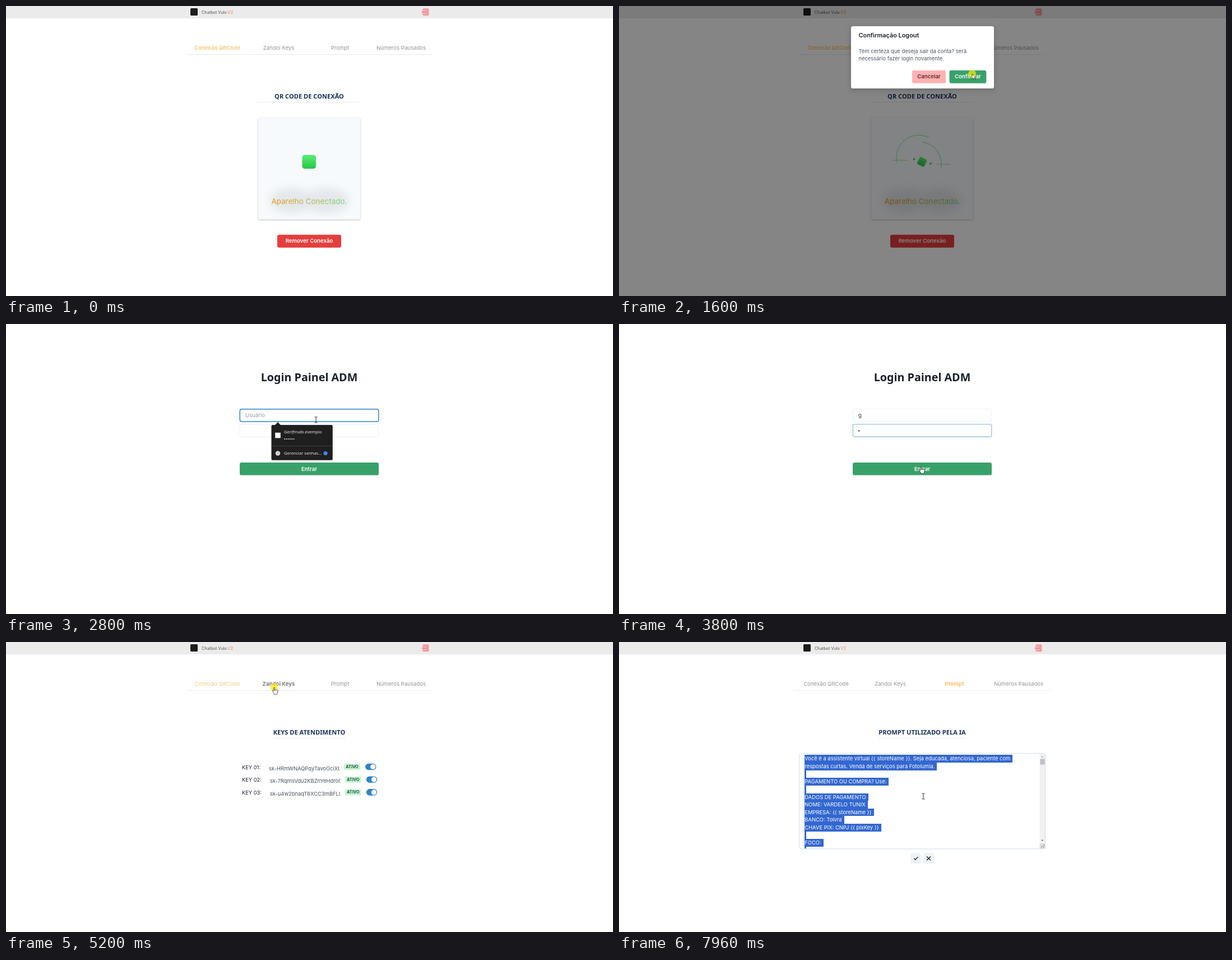
An HTML page for the animation above (8 s loop, 1083 by 517 pixels).

```html
<!DOCTYPE html>
<html lang="pt-BR">
<head>
<meta charset="utf-8">
<title>Painel</title>
<style>
html, body { margin: 0; width: 100%; height: 100%; overflow: hidden; background: #fff; }
svg { display: block; width: 100vw; height: 100vh; }
text, p { font: 400 9.6px Inter, "Open Sans", sans-serif; }
.mid { text-anchor: middle; }
.bold { font-weight: 600; }
.body { font-size: 9.4px; fill: #4a5568; }
.title { font: 700 11.1px "Noto Sans", "Open Sans", sans-serif; fill: #153057; text-anchor: middle; }
.rule { stroke: #e6eaee; stroke-width: 1; }
.white { fill: #fff; }

/* 1% of the loop is 80 ms */
.cut { animation: 8s step-end infinite; }
.flow { animation: 8s linear infinite; }

@keyframes panel { 0%, 53% { opacity: 1 } 21% { opacity: 0 } }
@keyframes login { 0%, 53%, 100% { opacity: 0 } 21% { opacity: 1 } }
@keyframes qr { 0% { opacity: 1 } 64%, 100% { opacity: 0 } }
@keyframes keys { 0%, 89%, 100% { opacity: 0 } 64% { opacity: 1 } }
@keyframes prompt { 0% { opacity: 0 } 89%, 100% { opacity: 1 } }
@keyframes preview { 0% { opacity: 1 } 98.9%, 100% { opacity: 0 } }
@keyframes edit { 0% { opacity: 0 } 98.9%, 100% { opacity: 1 } }

/* tabs */
.tab { fill: #959595; text-anchor: middle; }
#tab1 { --dx: -7.5px; animation: weight1 8s step-end infinite, color1 8s linear infinite, widen 8s step-end infinite; }
#tab2 { --dx: -2.5px; animation: weight2 8s step-end infinite, color2 8s linear infinite, widen 8s step-end infinite; }
#tab3 { --dx: 2.5px; animation: weight3 8s step-end infinite, color3 8s linear infinite, widen 8s step-end infinite; }
#tab4 { --dx: 8px; animation: widen 8s step-end infinite; }
@keyframes widen { 0% { translate: 0 } 98.9%, 100% { translate: var(--dx) } }
@keyframes weight1 { 0% { font-weight: 700 } 64%, 100% { font-weight: 400 } }
@keyframes weight2 { 0%, 89%, 100% { font-weight: 400 } 64% { font-weight: 700 } }
@keyframes weight3 { 0% { font-weight: 400 } 89%, 100% { font-weight: 700 } }
@keyframes color1 { 0%, 65% { fill: #f7cb80 } 67.5%, 100% { fill: #959595 } }
@keyframes color2 { 0%, 91.5%, 100% { fill: #959595 } 64%, 65% { fill: #7e7e7e } 67.5%, 89.5% { fill: #f6c26c } }
@keyframes color3 { 0%, 89.5% { fill: #959595 } 91.5%, 100% { fill: #f6c26c } }

/* connected icon */
#icon { transform-box: fill-box; transform-origin: center; animation-name: icon; }
@keyframes icon {
  0%, 17.5%, 57%, 100% { transform: none }
  20% { transform: rotate(27deg) scale(.58) }
  21%, 53% { transform: rotate(45deg) scale(.3) }
}
@keyframes burst { 0%, 17.5%, 56.5%, 100% { opacity: 0 } 19%, 53.5% { opacity: .8 } }

/* dialog */
#box { transform-origin: 541.5px 91.5px; animation-name: box; }
@keyframes shade { 0%, 10.2%, 21.1%, 100% { opacity: 0 } 11% { opacity: .33 } 12%, 21% { opacity: .48 } }
@keyframes box {
  0%, 10.2%, 21.1%, 100% { opacity: 0; transform: scale(.95) }
  11% { opacity: .68; transform: scale(.984) }
  11.8%, 21% { opacity: 1; transform: none }
}
@keyframes content { 0%, 10.2% { opacity: .3 } 11% { opacity: .65 } 12%, 100% { opacity: 1 } }

/* login form */
.field { fill: #fff; stroke: #e2e8f0; stroke-width: .7; }
@keyframes user {
  0%, 28%, 40.5%, 100% { stroke: #e2e8f0; stroke-width: .7 }
  29.5%, 39% { stroke: #3182ce; stroke-width: 1.5 }
}
@keyframes pass {
  0%, 39%, 48.5%, 100% { stroke: #e2e8f0; stroke-width: .7 }
  40.5%, 46.7% { stroke: #3182ce; stroke-width: 1.4 }
}
@keyframes hint { 0% { opacity: 1 } 36%, 100% { opacity: 0 } }
@keyframes typed { 0% { opacity: 0 } 36%, 100% { opacity: 1 } }
@keyframes dot { 0% { opacity: 0 } 42.5%, 100% { opacity: 1 } }
@keyframes menu { 0%, 36%, 100% { opacity: 0 } 30% { opacity: 1 } }
.menu { font: 400 7.5px "Noto Sans", "Open Sans", sans-serif; fill: #e8e8e8; }

/* key rows */
.key { font-size: 9.3px; fill: #1a202c; }
.secret { font-size: 9.4px; fill: #4a5361; }
.badge { font-size: 7.3px; font-weight: 700; fill: #22543d; text-anchor: middle; }
@keyframes left { 0% { translate: 0 } 78.5%, 100% { translate: -4px } }
@keyframes right { 0% { translate: 0 } 78.5%, 100% { translate: 4px } }
@keyframes on { 0% { opacity: 1 } 78.5%, 100% { opacity: 0 } }
@keyframes off { 0% { opacity: 0 } 78.5%, 100% { opacity: 1 } }
@keyframes pill { 0%, 78.5% { fill: #3182ce } 81%, 100% { fill: #cbd5e0 } }
@keyframes thumb { 0%, 78.5% { translate: 0 } 81%, 100% { translate: -8px } }

/* prompt text */
.preview { font-size: 9.4px; fill: #1a202c; text-anchor: middle; }
p { margin: 0; font-size: 9.4px; height: 13.63px; line-height: 13.63px; white-space: pre; }
p span { display: inline-block; min-width: 3px; height: 13.63px; background: #3367d1; color: #fff; vertical-align: top; }
p span:not(:empty) { padding-right: 4px; }

/* pointer */
#pointer { animation: path 8s ease-in-out infinite; }
@keyframes path {
  0%, 3.75% { translate: 790px -30px }
  8% { translate: 748px 14px }
  10%, 12% { translate: 747px 16px }
  19.25%, 21% { translate: 630px 121px }
  22.5% { translate: 622px 136px }
  27.5%, 30% { translate: 553px 168px }
  34%, 41% { translate: 553px 170.7px }
  46.5%, 54% { translate: 539px 254px }
  62.5%, 68% { translate: 478.5px 80.5px }
  74.5%, 79.5% { translate: 650px 220px }
  81.5%, 82.5% { translate: 652px 245px }
  87%, 90.5% { translate: 597px 76px }
  96.5%, 100% { translate: 543px 275px }
}
@keyframes arrow {
  0%, 10.4%, 43.5%, 53%, 68.5%, 80%, 82.8%, 91% { opacity: 1 }
  7.5%, 26.5%, 45.5%, 61.5%, 74%, 81%, 86.5%, 96.2%, 100% { opacity: 0 }
}
@keyframes hand {
  0%, 10.4%, 53%, 68.5%, 80%, 82.8%, 91%, 100% { opacity: 0 }
  7.5%, 45.5%, 61.5%, 74%, 81%, 86.5% { opacity: 1 }
}
@keyframes beam { 0%, 43.5% { opacity: 0 } 26.5%, 96.2%, 100% { opacity: 1 } }
@keyframes click {
  0%, 10.5%, 21%, 29.5%, 49.25%, 65.75%, 79.25%, 90%, 98.9%, 100% { opacity: 0 }
  9.75%, 19.5%, 28%, 47.75%, 63.75%, 77.75%, 88.5%, 97.75% { opacity: .72 }
}
</style>
</head>
<body>
<svg viewBox="0 0 1083 517" preserveAspectRatio="none">
  <defs>
    <linearGradient id="green" x2="0" y2="1"><stop stop-color="#59ee72"/><stop offset="1" stop-color="#25c648"/></linearGradient>
    <linearGradient id="warm"><stop stop-color="#f0961a"/><stop offset=".5" stop-color="#b5b848"/><stop offset="1" stop-color="#78d490"/></linearGradient>
    <filter id="blur" x="-60%" y="-60%" width="220%" height="220%"><feGaussianBlur stdDeviation="8"/></filter>
    <clipPath id="slot"><path d="M469 210h125.5v70h-125.5z"/></clipPath>
    <g id="active">
      <rect x="603" y="217" width="29" height="11" rx="1.5" fill="#c6f6d5"/>
      <text class="badge" x="617.5" y="225.1">ATIVO</text>
    </g>
    <g id="switch">
      <rect x="641" y="216.7" width="19.4" height="11.6" rx="5.8" fill="#3182ce"/>
      <circle class="white" cx="654.6" cy="222.5" r="4.6"/>
    </g>
  </defs>

  <g class="cut" style="animation-name:panel">
    <rect width="1083" height="22" fill="#ebebeb"/>
    <rect x="329" y="4" width="13" height="13" rx="1.5" fill="#1c1c1c"/>
    <text x="349" y="13.8" fill="#555" style="font-size:7.3px">Chatbot Vulo</text>
    <text x="395" y="14" fill="#f0835a" style="font-size:8px">V2</text>
    <rect x="743.5" y="4.3" width="11" height="13" rx="2" fill="#f29ba2"/>
    <rect x="741.5" y="8" width="8.5" height="6" rx="1.5" fill="#f7bcc0"/>
    <path d="M743.5 11h6" stroke="#c8434e" stroke-width="1.5" stroke-dasharray="1.5 .8"/>

    <text class="tab" id="tab1" x="377" y="78.2">Conexão QRCode</text>
    <text class="tab" id="tab2" x="486.5" y="78.2">Zandoi Keys</text>
    <text class="tab" id="tab3" x="596" y="78.2">Prompt</text>
    <text class="tab" id="tab4" x="705" y="78.2">Números Pausados</text>
    <path class="rule" d="M322 86.5H760"/>
    <path class="rule cut" style="animation-name:edit" d="M312 86.5H322M760 86.5H770"/>

    <g class="cut" style="animation-name:qr">
      <text class="title" x="541" y="165.2">QR CODE DE CONEXÃO</text>
      <path class="rule" d="M450 171.5H632"/>
      <rect x="450" y="199" width="182" height="181.5" rx="3" fill="#f7fafc" style="filter:drop-shadow(0 1.5px 1.5px #0004)"/>
      <g filter="url(#blur)" opacity=".07">
        <ellipse cx="510" cy="347" rx="40" ry="23"/>
        <ellipse cx="572" cy="347" rx="40" ry="23"/>
      </g>
      <g class="flow" style="animation-name:burst" fill="none" stroke="#62d67c">
        <path d="M496 279A40 40 0 0 1 552 234M541 243A36 40 0 0 1 575 288"/>
        <path d="M487 275h27M567 282h25" stroke-width=".8"/>
        <path d="M525 274l3-2M554 282l4-2" stroke="#2fc14f" stroke-width="3"/>
      </g>
      <rect id="icon" class="flow" x="528.5" y="265.5" width="24.5" height="24.5" rx="4.5" fill="url(#green)"/>
      <text class="mid" x="541" y="353" fill="url(#warm)" style="font-size:13.5px">Aparelho Conectado.</text>
      <rect x="484" y="407.7" width="114" height="23" rx="3.2" fill="#e53e3e"/>
      <text class="mid bold white" x="541" y="422.3">Remover Conexão</text>
    </g>

    <g class="cut" style="animation-name:keys">
      <text class="title" x="541" y="165.2">KEYS DE ATENDIMENTO</text>
      <path class="rule" d="M477 171.5H606"/>
      <g class="cut" style="animation-name:left">
        <text class="key" x="421" y="226.5">KEY 01:</text>
        <g clip-path="url(#slot)"><text class="secret" x="469" y="228.8">sk-HRmWNAQPqyTavoGciXbLu</text></g>
      </g>
      <g class="cut" style="animation-name:on"><use href="#active"/></g>
      <g class="cut" style="animation-name:off">
        <rect x="599" y="217" width="38" height="11" rx="1.5" fill="#fed7d7"/>
        <text class="badge" x="618" y="225.1" style="fill:#822727">INATIVO</text>
      </g>
      <g class="cut" style="animation-name:right">
        <rect class="flow" style="animation-name:pill" x="641" y="216.7" width="19.4" height="11.6" rx="5.8"/>
        <circle class="white flow" style="animation-name:thumb" cx="654.6" cy="222.5" r="4.6"/>
      </g>
      <text class="key" x="421" y="249.2">KEY 02:</text>
      <text class="key" x="421" y="271.9">KEY 03:</text>
      <g transform="translate(1.8 22.7)">
        <g clip-path="url(#slot)"><text class="secret" x="469" y="228.8">sk-7RqmsVdu2KBZnYeHdroGa</text></g>
        <use href="#active"/><use href="#switch"/>
      </g>
      <g transform="translate(1.8 45.4)">
        <g clip-path="url(#slot)"><text class="secret" x="469" y="228.8">sk-u4w2bnaqT6XCC3mBFLOWe</text></g>
        <use href="#active"/><use href="#switch"/>
      </g>
    </g>

    <g class="cut" style="animation-name:prompt">
      <text class="title" x="541" y="165.2">PROMPT UTILIZADO PELA IA</text>
      <path class="rule" d="M463 171.5H619"/>
      <g class="cut" style="animation-name:preview">
        <text class="preview" x="541" y="211.6">Você é a assistente virtual {{ storeName }}. Seja educada, atenciosa, paciente com</text>
        <text class="preview" x="541" y="225.2">respostas curtas. Venda de serviços para Fotolumia. PAGAMENTO OU</text>
        <text class="preview" x="541" y="238.9">COMPRA? Use: DADOS DE PAGAMENTO NOME: VARDELO TUNIX</text>
        <text class="preview" x="541" y="252.5">EMPRESA: {{ storeName }} BANCO: Tolvra CHAVE PIX: CNPJ {{ pixKey }}</text>
      </g>
      <g class="cut" style="animation-name:edit">
        <rect x="321.9" y="198.7" width="438.6" height="170.2" rx="3" fill="#fff" stroke="#c6dcf0" stroke-width=".9"/>
        <foreignObject x="331.3" y="201.4" width="418" height="167">
          <p><span>Você é a assistente virtual {{ storeName }}. Seja educada, atenciosa, paciente com</span></p>
          <p><span>respostas curtas. Venda de serviços para Fotolumia.</span></p>
          <p><span></span></p>
          <p><span>PAGAMENTO OU COMPRA? Use:</span></p>
          <p><span></span></p>
          <p><span>DADOS DE PAGAMENTO</span></p>
          <p><span>NOME: VARDELO TUNIX</span></p>
          <p><span>EMPRESA: {{ storeName }}</span></p>
          <p><span>BANCO: Tolvra</span></p>
          <p><span>CHAVE PIX: CNPJ {{ pixKey }}</span></p>
          <p><span></span></p>
          <p><span>FOCO:</span></p>
          <p><span></span></p>
        </foreignObject>
        <path d="M750.5 199.5h9.5v159.5h-9.5z" fill="#f1f1f1"/>
        <path d="M751.5 208.5h8v10h-8z" fill="#c1c1c1"/>
        <path d="M753.3 205.5l2-2.3 2 2.3z" fill="#a3a3a3"/>
        <path d="M753.3 352.8l2 2.3 2-2.3z" fill="#505050"/>
        <path d="M750.5 359h9.5v9.3h-9.5z" fill="#dcdcdc"/>
        <path d="M753 367l6-6M756.5 367l2.5-2.5" stroke="#777" stroke-width=".8"/>
        <rect x="520.5" y="376.5" width="18.5" height="18.5" rx="3.2" fill="#edf2f7"/>
        <rect x="543.3" y="376.5" width="18.5" height="18.5" rx="3.2" fill="#edf2f7"/>
        <path d="M526.3 385.8l2.3 2.4 4.7-5M549 382.2l7 7m0-7l-7 7" fill="none" stroke="#1a202c" stroke-width="1.3"/>
      </g>
    </g>
  </g>

  <g class="cut" style="animation-name:login">
    <text class="title" x="541" y="102" style="font-size:19.7px;fill:#1a202c">Login Painel ADM</text>
    <rect class="field flow" style="animation-name:user" x="417.3" y="151.7" width="247.5" height="22.3" rx="3.2"/>
    <rect class="field flow" style="animation-name:pass" x="417.3" y="178.8" width="247.5" height="22.3" rx="3.2"/>
    <text class="cut" style="animation-name:hint" x="427" y="166.4" fill="#929bab">Usuário</text>
    <text class="cut" style="animation-name:typed" x="427" y="166.4" fill="#2d3748">g</text>
    <circle class="cut" style="animation-name:dot" cx="428.2" cy="190.5" r="1.2" fill="#2d3748"/>
    <rect x="417" y="247" width="248" height="22.6" rx="3.2" fill="#38a169"/>
    <text class="mid bold white" x="541" y="261.8">Entrar</text>
    <g class="cut" style="animation-name:menu">
      <rect x="473.5" y="180" width="109.3" height="62.8" rx="2" fill="#1f1f1f"/>
      <path d="M479.5 180.5l5.5-5.5 5.5 5.5z" fill="#1f1f1f"/>
      <path d="M473.5 217.5h109.3" stroke="#4c4c4c" stroke-width=".8"/>
      <rect class="white" x="480.2" y="193.7" width="9.6" height="9.6"/>
      <text class="menu" x="496" y="195">Ger@nulb.exemplo</text>
      <path d="M497.2 205h18" stroke="#e8e8e8" stroke-width="2" stroke-linecap="round" stroke-dasharray="0 3.25"/>
      <circle cx="485" cy="230.5" r="4.3" fill="#cfcfcf"/>
      <text class="menu" x="496" y="233.3">Gerenciar senhas...</text>
      <circle cx="570" cy="230.5" r="3.6" fill="#4285f4"/>
    </g>
  </g>

  <rect class="flow" style="animation-name:shade" width="1083" height="517"/>
  <g id="box" class="flow">
    <rect class="white" x="414" y="36" width="255" height="111" rx="3.5" style="filter:drop-shadow(0 3px 5px #0003)"/>
    <g class="flow" style="animation-name:content">
      <text class="bold" x="427.5" y="56" fill="#1a202c" style="font-size:10.9px">Confirmação Logout</text>
      <text class="body" x="427.5" y="83.8">Tem certeza que deseja sair da conta? será</text>
      <text class="body" x="427.5" y="97.4">necessário fazer login novamente.</text>
      <rect x="523" y="114.8" width="60" height="23" rx="3.2" fill="#feb2b2"/>
      <text class="mid bold" x="553" y="129.4" fill="#5f2a2e">Cancelar</text>
      <rect x="589.5" y="114.8" width="65.8" height="23" rx="3.2" fill="#38a169"/>
      <text class="mid bold white" x="622.4" y="129.4">Confirmar</text>
    </g>
  </g>

  <g id="pointer" stroke="#111" stroke-width=".7" stroke-linejoin="round" fill="#fff">
    <circle class="cut" style="animation-name:click" r="7" fill="#fcea08" stroke="none"/>
    <path class="cut" style="animation-name:arrow" d="M0 0v9.5l2.2-2 1.5 3.4 1.5-.6-1.5-3.4h3z"/>
    <path class="cut" style="animation-name:hand" d="M-.8 1v6l-1.4-1.3c-1-.8-1.8.2-1.2 1l3 4.6v1.4h5.6v-1.6c1-1.6 1-3.4 1-5.2 0-1.2-1.6-1.2-1.8-.2 0-1.2-1.6-1.2-1.8-.1 0-1.1-1.6-1.1-1.8 0V1c0-1.2-1.6-1.2-1.6 0z"/>
    <path class="cut" style="animation-name:beam" fill="none" stroke-width=".9" d="M-2.5-5h1.8l.7.6.7-.6h1.8M0-4.4v8.8M-2.5 5h1.8l.7-.6.7.6h1.8"/>
  </g>
</svg>
</body>
</html>
```
